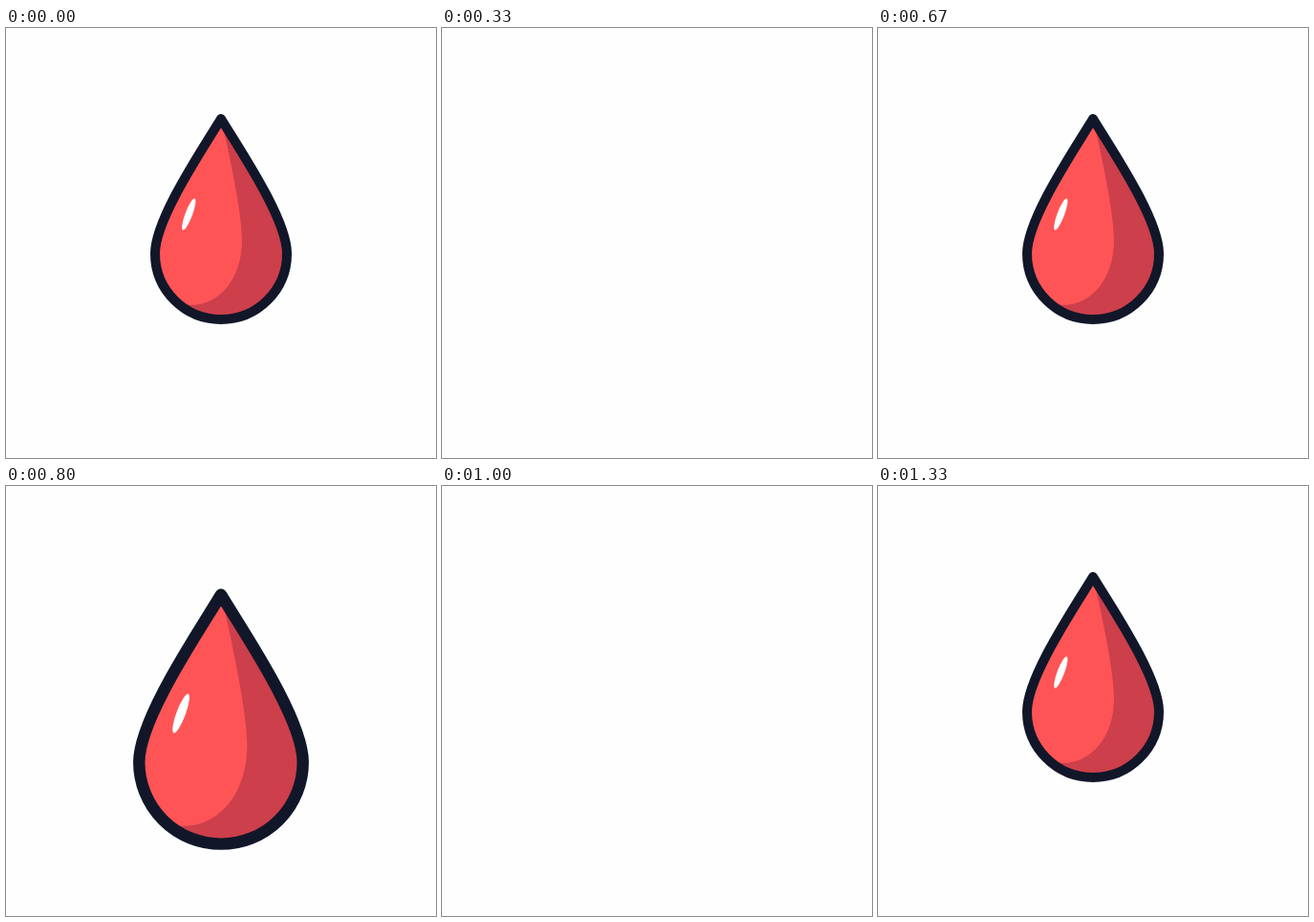
An HTML page that plays this animation: 450 px wide and 450 px high, repeating every 1360 ms.

```html
<!DOCTYPE html>
<html lang="en">
<head>
<meta charset="utf-8">
<title>Drop</title>
<style>
  html, body { margin: 0; width: 100%; height: 100%; overflow: hidden; background: #fefefe; }
  svg { display: block; width: 100%; height: 100%; }
</style>
</head>
<body>
<svg viewBox="0 0 450 450">
  <defs>
    <path id="shape" d="M225 95C205 128 156 200 156 236A69 69 0 0 0 294 236C294 200 245 128 225 95Z"/>
    <clipPath id="inside"><use href="#shape"/></clipPath>
  </defs>
  <g id="drop" visibility="hidden">
    <use href="#shape" fill="#ff5456"/>
    <path clip-path="url(#inside)" fill="#cc3f4b"
      d="M225 95C235 137 247 196 247 222C247 262 224 290 193 290L180 288V320H310V95Z"/>
    <ellipse rx="3.8" ry="17.6" transform="translate(191.3 195) rotate(20.5)" fill="#fff"/>
    <use href="#shape" fill="none" stroke="#111729" stroke-width="10" stroke-linejoin="round"/>
  </g>
</svg>
<script>
  const LOOP = 1360, STEP = 100 / 3, BEAT = 20;
  const GROW = 5, FALL = 6, GONE = 15;
  const MID = 199.7;
  const drop = document.getElementById('drop');

  const easeOut = (u, power = 3) => 1 - (1 - Math.min(1, Math.max(0, u))) ** power;

  // Size and centre height at a step of the beat
  function pose(step) {
    if (step <= FALL) {
      const size = easeOut(step / GROW, 2.33);
      return { size, y: MID - 155.8 * (1 - size) };
    }
    const since = step - FALL;
    return {
      size: 1 + 0.298 * easeOut(since / 7),
      y: MID + 62.7 * easeOut(since / (GONE - FALL))
    };
  }

  function draw(time) {
    const tick = Math.floor((time % LOOP + 5) / STEP);
    const step = (tick + 5) % BEAT;
    const shown = step > 0 && step < GONE;
    drop.setAttribute('visibility', shown ? 'visible' : 'hidden');
    if (!shown) return;
    const { size, y } = pose(step);
    drop.setAttribute('transform', `translate(225 ${y}) scale(${size}) translate(-225 ${-MID})`);
  }

  const start = performance.now();
  function loop() {
    draw(performance.now() - start);
    requestAnimationFrame(loop);
  }
  loop();
</script>
</body>
</html>
```
